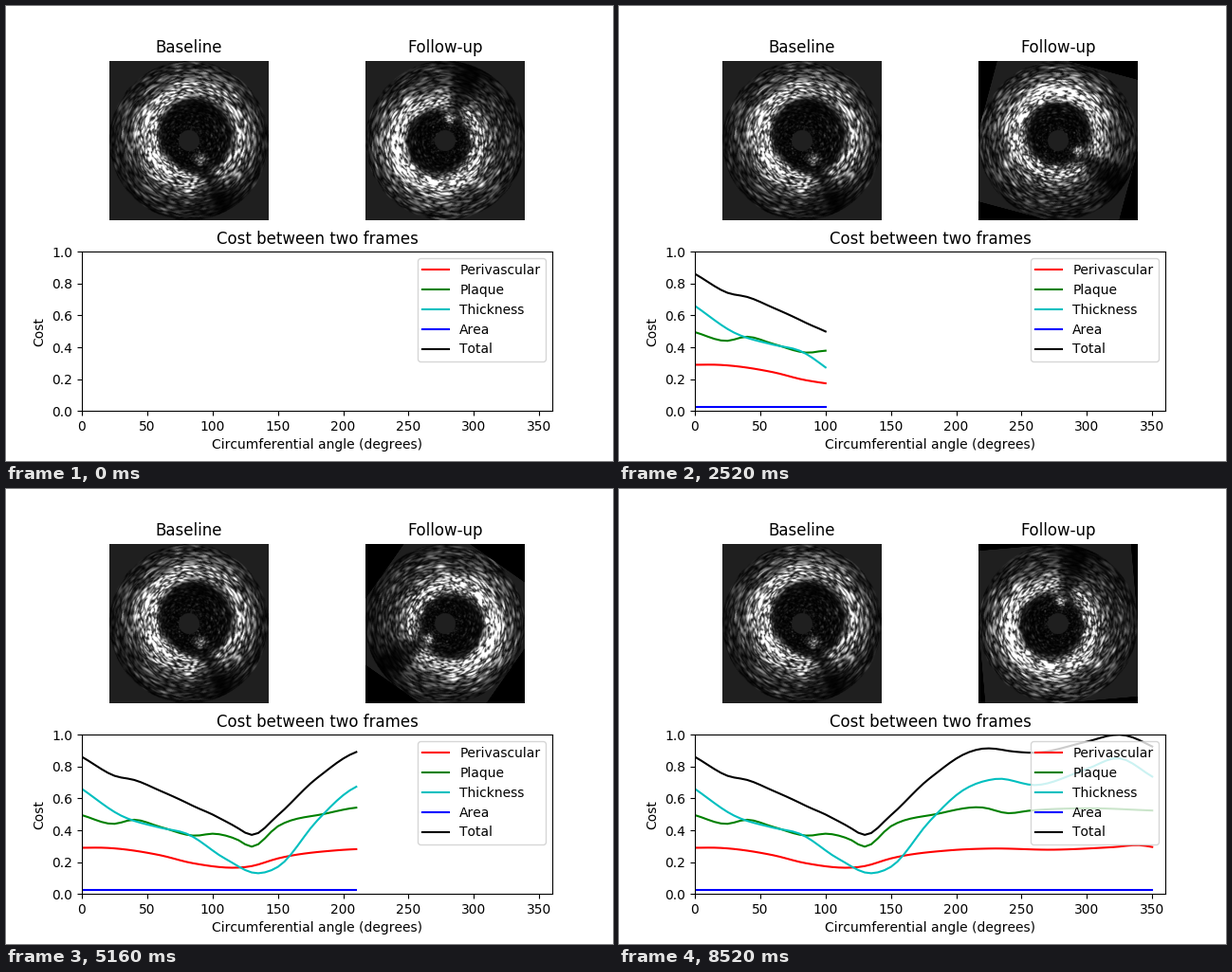
These frames come from a looping animation (640 by 480 pixels, 8640 ms). A matplotlib script:

```python
import numpy as np
import matplotlib.pyplot as plt
from matplotlib.animation import FuncAnimation
from matplotlib.transforms import Affine2D

plt.rcParams["text.kerning_factor"] = 6   # whole-pixel glyph spacing

FRAMES, INTERVAL, STEP = 72, 120, 5
SIZE = 336          # pixels along one side of an ultrasound image
RADIUS = 84         # scan radius in stage pixels
GREY = 0.122


def speckle(rng, r, theta, sigmas):
    """Blurred complex noise in polar space: streaks along the scan, mean 1."""
    shape = (180, 720)
    noise = rng.normal(size=shape) + 1j * rng.normal(size=shape)
    fr, ft = (np.fft.fftfreq(n) for n in shape)
    kernel = np.exp(-2 * np.pi**2 * ((sigmas[0] * fr[:, None])**2 + (sigmas[1] * ft)**2))
    texture = np.abs(np.fft.ifft2(np.fft.fft2(noise) * kernel))
    rows = np.clip(r * 2, 0, shape[0] - 1).astype(int)
    cols = (theta * 2).astype(int) % shape[1]
    return texture[rows, cols] / texture.mean()


def lobe(theta, mean, swing, heading):
    """A value that is largest towards one heading."""
    return mean + swing * np.cos(np.radians(theta - heading))


def vessel(seed, lumen, ring, outer, shadow, spot):
    rng = np.random.default_rng(seed)
    axis = (np.arange(SIZE) + 0.5) / SIZE * 2 * RADIUS - RADIUS
    x, y = np.meshgrid(axis, -axis)
    r, theta = np.hypot(x, y), np.degrees(np.arctan2(y, x)) % 360

    wall = lobe(theta, *lumen)
    inside = 1 / (1 + np.exp((wall - r) / 2))
    tissue = lobe(theta, *outer) + lobe(theta, *ring) * np.exp(-((r - wall - 9) / 13)**2)
    gap = (theta - shadow + 180) % 360 - 180
    tissue *= 1 - 0.85 * np.exp(-(gap / 14)**2)
    tissue *= 1 - 0.6 * (r / RADIUS)**8

    spot_r, spot_angle = spot[0], np.radians(spot[1])
    sx, sy = spot_r * np.cos(spot_angle), spot_r * np.sin(spot_angle)
    glow = 0.55 * np.exp(-((x - sx)**2 + (y - sy)**2) / 30)

    streaks = speckle(rng, r, theta, (1.4, 5))
    grains = speckle(rng, r, theta, (1.2, 5))
    image = tissue * inside * streaks**1.2 + glow * grains
    image += 0.035 * (1 - inside) * grains**2
    image[(r < 11) | (r > RADIUS)] = GREY
    return np.clip(image, 0, 1)


def curve(*keys):
    """Smooth cubic through a few (angle, cost) keys."""
    xs, ys = np.array(keys).T
    slopes = np.gradient(ys, xs)
    k = np.clip(np.searchsorted(xs, angles, side="right") - 1, 0, len(xs) - 2)
    width = xs[k + 1] - xs[k]
    t = (angles - xs[k]) / width
    ease = t * t * (3 - 2 * t)
    bend = t * (1 - t) * ((1 - t) * slopes[k] - t * slopes[k + 1])
    return ys[k] + ease * (ys[k + 1] - ys[k]) + width * bend


angles = np.arange(0, FRAMES * STEP - STEP, STEP)
perivascular = curve((0, .29), (17, .29), (60, .243), (85, .193), (130, .175),
                     (150, .223), (195, .274), (225, .285), (275, .278),
                     (320, .294), (342, .305), (350, .295))
plaque = curve((0, .495), (24, .44), (40, .466), (60, .421), (86, .366), (102, .378),
               (118, .345), (130, .297), (150, .425), (185, .502), (220, .543),
               (240, .507), (255, .522), (300, .538), (350, .524))
thickness = curve((0, .66), (30, .492), (60, .416), (80, .379), (110, .22),
                  (135, .13), (150, .17), (180, .46), (205, .65), (230, .722),
                  (262, .684), (300, .785), (325, .852), (350, .737))
area = np.full(len(angles), .0275)
total = perivascular + plaque + thickness + area
total = total / total.max()

baseline = vessel(4, lumen=(39, 9, 40), ring=(.43, .2, 200), outer=(.2, .03, 60),
                  shadow=298, spot=(23, 301))
follow_up = vessel(9, lumen=(34, 8, 195), ring=(.46, .12, 215), outer=(.21, .06, 225),
                   shadow=70, spot=(25, 78))

fig = plt.figure(figsize=(6.4, 4.8), dpi=100)


def show_image(position, image, title):
    ax = fig.add_subplot(2, 2, position, facecolor="black")
    artist = ax.imshow(image, cmap="gray", vmin=0, vmax=1)
    ax.set(xlim=(-0.5, SIZE - 0.5), ylim=(SIZE - 0.5, -0.5), xticks=[], yticks=[], title=title)
    ax.spines[:].set_visible(False)
    return ax, artist


show_image(1, baseline, "Baseline")
turn_ax, turning = show_image(2, follow_up, "Follow-up")

cost_ax = fig.add_subplot(2, 1, 2)
cost_ax.set(xlim=(0, 360), ylim=(0, 1), title="Cost between two frames",
            xlabel="Circumferential angle (degrees)", ylabel="Cost")
series = [("Perivascular", "r", perivascular), ("Plaque", "g", plaque),
          ("Thickness", "c", thickness), ("Area", "b", area), ("Total", "k", total)]
lines = [cost_ax.plot([], [], color, label=name)[0] for name, color, _ in series]
cost_ax.legend(loc="upper right")


def update(i):
    middle = (SIZE - 1) / 2
    spin = Affine2D().rotate_deg_around(middle, middle, STEP * i)
    turning.set_transform(spin + turn_ax.transData)
    for line, (_, _, values) in zip(lines, series):
        line.set_data(angles[:i], values[:i])
    return [turning, *lines]


anim = FuncAnimation(fig, update, frames=FRAMES, interval=INTERVAL,
                     init_func=lambda: update(0), repeat=True, repeat_delay=0)
plt.show()
```
